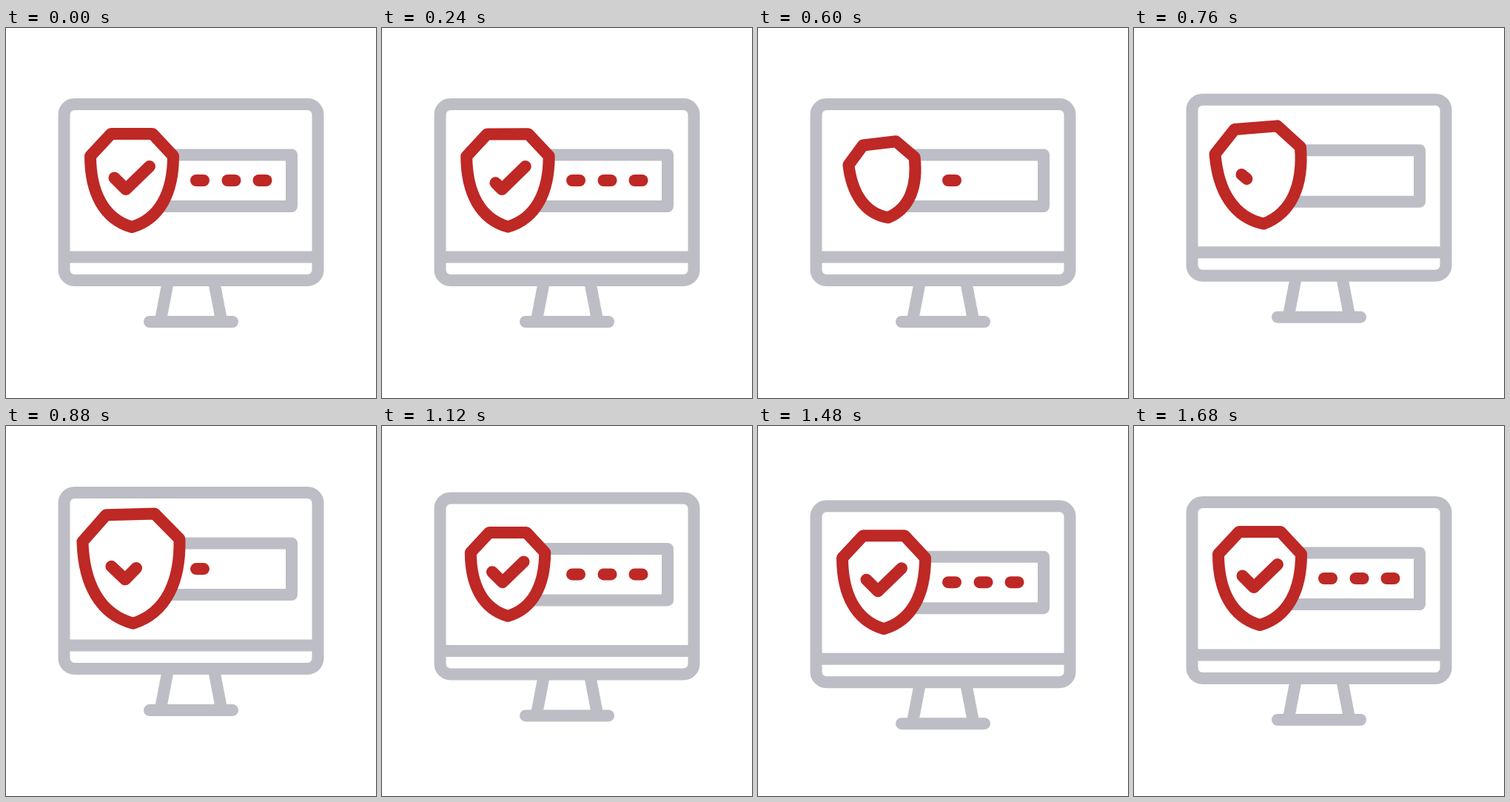
Recreate the animation shown at these times as an HTML page with a canvas. Size 500 by 500 pixels, loop 2.04 s.

```html
<!DOCTYPE html>
<html lang="en">
<head>
<meta charset="utf-8">
<title>Secure login</title>
<style>
  html, body { margin: 0; width: 100%; height: 100%; overflow: hidden; background: #fff; }
  canvas { display: block; width: 500px; height: 500px; }
</style>
</head>
<body>
<canvas id="stage" width="500" height="500"></canvas>
<script>
const ctx = document.getElementById('stage').getContext('2d');
const LOOP = 2040, STEP = 40;
const GRAY = '#bdbdc5', RED = '#be2825';

// Keyframes are [time, value] pairs, eased in and out between neighbours.
const LIFT = [[605, 0], [935, -14], [960, -14], [1340, 8], [1690, 0]];
const SCALE = [[200, 1], [620, 0.8], [860, 1.175], [1110, 0.895], [1300, 1]];
const TILT = [[200, 0], [620, -6.7], [1000, 0]];
const DRAW = [[680, 0], [1030, 1]];

// Each dot: centre x, time it is deleted, time it is typed again.
const DOTS = [[262, 640, 800], [304.5, 480, 960], [346.5, 320, 1120]];

const CHECK = [[-23.5, -3.5], [-8, 12], [24, -19]];
const CHECK_LENGTH = Math.hypot(15.5, 15.5) + Math.hypot(32, 31);

function valueAt(keys, t) {
  if (t <= keys[0][0]) return keys[0][1];
  for (let i = 1; i < keys.length; i++) {
    const [t0, v0] = keys[i - 1], [t1, v1] = keys[i];
    if (t < t1) {
      const u = (t - t0) / (t1 - t0);
      return v0 + (v1 - v0) * u * u * (3 - 2 * u);
    }
  }
  return keys[keys.length - 1][1];
}

function easeCubic(u) {
  u = Math.min(1, Math.max(0, u));
  return u < 0.5 ? 4 * u ** 3 : 1 - 4 * (1 - u) ** 3;
}

function trace(points) {
  ctx.beginPath();
  points.forEach(([x, y]) => ctx.lineTo(x, y));
}

function line(...points) {
  trace(points);
  ctx.stroke();
}

function drawMonitor() {
  ctx.strokeStyle = GRAY;
  line([218.5, 345], [209.5, 392]);
  line([281.5, 345], [290.5, 392]);
  line([194, 397], [306, 397]);
  ctx.beginPath();
  ctx.roundRect(78.5, 103, 343, 238, 14);
  ctx.stroke();
  line([79, 309.5], [421, 309.5]);
  line([190, 171.5], [386, 171.5], [386, 241], [190, 241]);
}

function drawDots(t) {
  ctx.strokeStyle = RED;
  for (const [x, hide, show] of DOTS) {
    if (t < hide || t >= show) line([x - 5, 206], [x + 5, 206]);
  }
}

// Builds a path in shield space; the stroke width stays unscaled.
function inShield(scale, tilt, build) {
  ctx.save();
  ctx.translate(170, 206);
  ctx.rotate(tilt * Math.PI / 180);
  ctx.scale(scale, scale);
  build();
  ctx.restore();
}

function drawShield(t) {
  const scale = valueAt(SCALE, t), tilt = valueAt(TILT, t);
  inShield(scale, tilt, () => {
    trace([[-56, -33], [-28, -63], [28, -63], [56, -33]]);
    ctx.bezierCurveTo(56, 16, 38, 52, 0, 63);
    ctx.bezierCurveTo(-38, 52, -56, 16, -56, -33);
    ctx.closePath();
  });
  ctx.fillStyle = '#fff';
  ctx.strokeStyle = RED;
  ctx.fill();
  ctx.stroke();

  const erasing = t < 640;
  const from = erasing ? easeCubic((t - 75) / 500) : 0;
  const to = erasing ? 1 : valueAt(DRAW, t);
  if (to <= from) return;
  const length = CHECK_LENGTH * scale;
  inShield(scale, tilt, () => trace(CHECK));
  ctx.setLineDash([(to - from) * length, length * 2]);
  ctx.lineDashOffset = -from * length;
  ctx.stroke();
  ctx.setLineDash([]);
}

function render(t) {
  ctx.fillStyle = '#fff';
  ctx.fillRect(0, 0, 500, 500);
  ctx.save();
  ctx.lineWidth = 16;
  ctx.lineCap = ctx.lineJoin = 'round';
  ctx.translate(0, valueAt(LIFT, t));
  drawMonitor();
  drawDots(t);
  drawShield(t);
  ctx.restore();
}

const start = performance.now();

function tick() {
  const t = (performance.now() - start) % LOOP;
  render(Math.floor(t / STEP) * STEP);
  requestAnimationFrame(tick);
}
tick();
</script>
</body>
</html>
```
